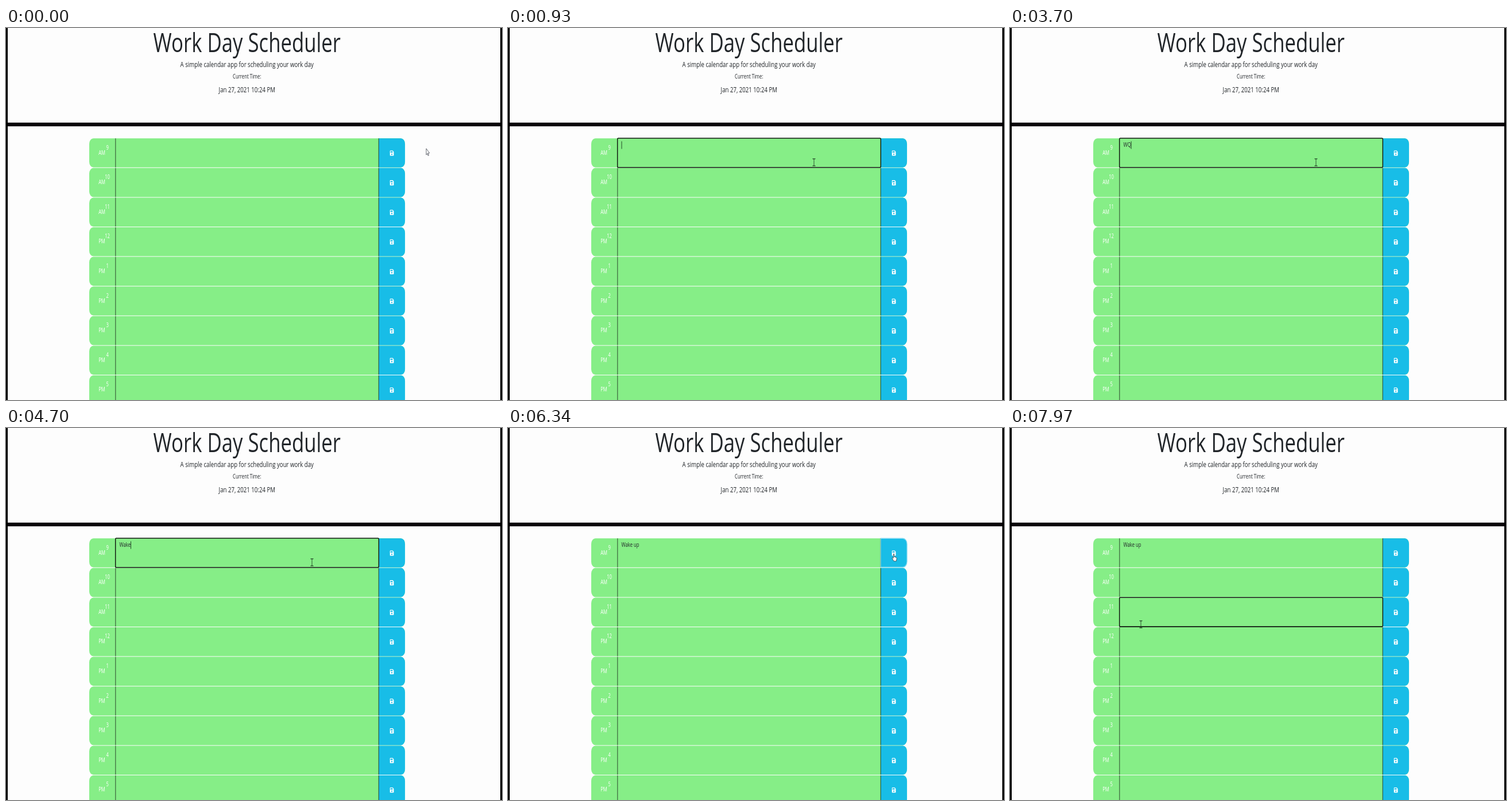
An HTML page for the animation above (8 s loop, 864 px wide and 648 px high).

```html
<!DOCTYPE html>
<html lang="en">
<head>
<meta charset="utf-8">
<title>Work Day Scheduler</title>
<style>
  html, body { margin: 0; height: 100%; overflow: hidden; background: #fdfdfd; }
  svg { display: block; width: 100vw; height: 100vh; }
  text { font-family: "Open Sans", sans-serif; font-size: 16px; fill: #212529; white-space: pre; }
  .heading { text-anchor: middle; }
  .hour { fill: #fff; }
  .border { stroke: #1c2a1c; stroke-width: 1.5; }
</style>
</head>
<body>
<svg viewBox="0 0 864 648">
  <!-- the page is shown narrower than it is laid out -->
  <g id="page" transform="scale(.4825 .645)">
    <g class="heading">
      <text x="870" y="65.5" style="font-size:72px">Work Day Scheduler</text>
      <text x="870" y="105" style="font-size:20px">A simple calendar app for scheduling your work day</text>
      <text x="870" y="136.5">Current Time:</text>
      <text x="870" y="173" style="font-size:20px">Jan 27, 2021 10:24 PM</text>
    </g>
    <rect y="255.5" width="1791" height="10" fill="#0b050b"/>
    <g id="rows"></g>
    <path id="glow" d="M1345.5 298H1425.5a15 15 0 0 1 15 15v48a15 15 0 0 1 -15 15H1345.5Z"
          fill="none" stroke="#8adcf3" stroke-width="2.5"/>
    <rect id="focus" x="395" width="951" height="79" rx="3" fill="none" stroke="#10180f" stroke-width="2.6"/>
    <text id="entry" x="409.5" y="321.5"></text>
    <rect id="caret" width="1.8" height="20.5" fill="#16301a"/>
    <g id="mouse">
      <path id="arrow" d="M0 0V17L4 13.3L6.6 19.3L9.3 18.2L6.8 12.3H12Z" fill="#fff" stroke="#333843" stroke-width="1.3"/>
      <path id="beam" d="M-5 -9.5H-1.5L0 -8.5L1.5 -9.5H5M0 -8.5V8.5M-5 9.5H-1.5L0 8.5L1.5 9.5H5" fill="none" stroke="#1d3a20" stroke-width="1.7"/>
      <path id="hand" d="M-1.5 1.5Q0 -1 1.5 1.5V8L9 10Q11 11 10.5 14L9 20H0L-6 12Q-5 9 -1.5 12Z" fill="#fff" stroke="#222" stroke-width="1.2"/>
    </g>
    <path d="M0 0H6.2V1005H0ZM1784.5 0H1791V1005H1784.5Z" fill="#000"/>
  </g>
</svg>
<script>
const LOOP = 8000, ROW_TOP = 298, ROW_STEP = 80;
const SCALE_X = 0.4825, SCALE_Y = 0.645;
const CLICK_FIRST = 850, CLICK_SAVE = 6250, CLICK_THIRD = 7420;
const $ = id => document.getElementById(id);

// [time, x, y] in stage pixels
const mousePath = [
  [30, 732, 210], [680, 533, 234], [5680, 533, 234], [6130, 672, 219],
  [6460, 672, 219], [7010, 185.5, 350], [7130, 172, 360], [7380, 228, 342]
];
// [time, text in the first entry]
const typing = [
  [0, ""], [3400, "W"], [3580, "WQ"], [3960, "W"], [4240, "Wa"], [4400, "Wak"],
  [4560, "Wake"], [4760, "Wake "], [4960, "Wake u"], [5200, "Wake up"]
];

const SAVE_ICON = "M1.5 0H10.5L14 3.5V12.5Q14 14 12.5 14H1.5Q0 14 0 12.5V1.5Q0 0 1.5 0Z" +
  "M2 2V5.5H10V2ZM7 7.6a2.2 2.2 0 1 0 .01 0Z";

function rowMarkup(hour, index) {
  return `<g transform="translate(300.5 ${ROW_TOP + index * ROW_STEP})">
    <rect width="1140" height="78.4" rx="15" fill="#86ee87"/>
    <path d="M1045 0H1125a15 15 0 0 1 15 15V63.4a15 15 0 0 1 -15 15H1045Z" fill="#18bde7"/>
    <path class="border" d="M95 0V78.4M1045 0V78.4"/>
    <text class="hour" x="33.5" y="44">${hour < 12 ? "AM" : "PM"}</text>
    <text class="hour" x="65.5" y="30" text-anchor="middle">${(hour + 11) % 12 + 1}</text>
    <path transform="translate(1085.5 33)" d="${SAVE_ICON}" fill="#fff" fill-rule="evenodd"/>
  </g>`;
}
$("rows").innerHTML = Array.from({ length: 9 }, (_, i) => rowMarkup(9 + i, i)).join("");

const show = (id, visible) => $(id).setAttribute("visibility", visible ? "visible" : "hidden");

function mouseAt(t) {
  const next = mousePath.findIndex(p => p[0] > t);
  if (next === 0) return mousePath[0].slice(1);
  if (next < 0) return mousePath.at(-1).slice(1);
  const [t0, x0, y0] = mousePath[next - 1], [t1, x1, y1] = mousePath[next];
  const u = (t - t0) / (t1 - t0), eased = u * u * (3 - 2 * u);
  return [x0 + (x1 - x0) * eased, y0 + (y1 - y0) * eased];
}

function draw(t) {
  const [typedAt, text] = typing.findLast(step => step[0] <= t);
  const inFirst = t >= CLICK_FIRST && t < CLICK_SAVE;
  const inThird = t >= CLICK_THIRD;
  const rowY = ROW_TOP + (inThird ? 2 * ROW_STEP : 0);
  $("entry").textContent = text;

  show("focus", inFirst || inThird);
  $("focus").setAttribute("y", rowY - 0.3);
  show("glow", t >= CLICK_SAVE && !inThird);

  const blinkStart = inThird ? CLICK_THIRD : Math.max(CLICK_FIRST, typedAt);
  show("caret", (inFirst || inThird) && (t - blinkStart) % 1000 < 500);
  const textWidth = inFirst && text ? $("entry").getComputedTextLength() : 0;
  $("caret").setAttribute("x", 409.5 + textWidth);
  $("caret").setAttribute("y", rowY + 8);

  const [x, y] = mouseAt(t);
  $("mouse").setAttribute("transform", `translate(${x / SCALE_X} ${y / SCALE_Y})`);
  const kind = x < 190.5 || x > 695 ? "arrow" : x < 649 ? "beam" : "hand";
  for (const id of ["arrow", "beam", "hand"]) show(id, id === kind);
}

function tick() {
  draw(performance.now() % LOOP);
  requestAnimationFrame(tick);
}
tick();
</script>
</body>
</html>
```
